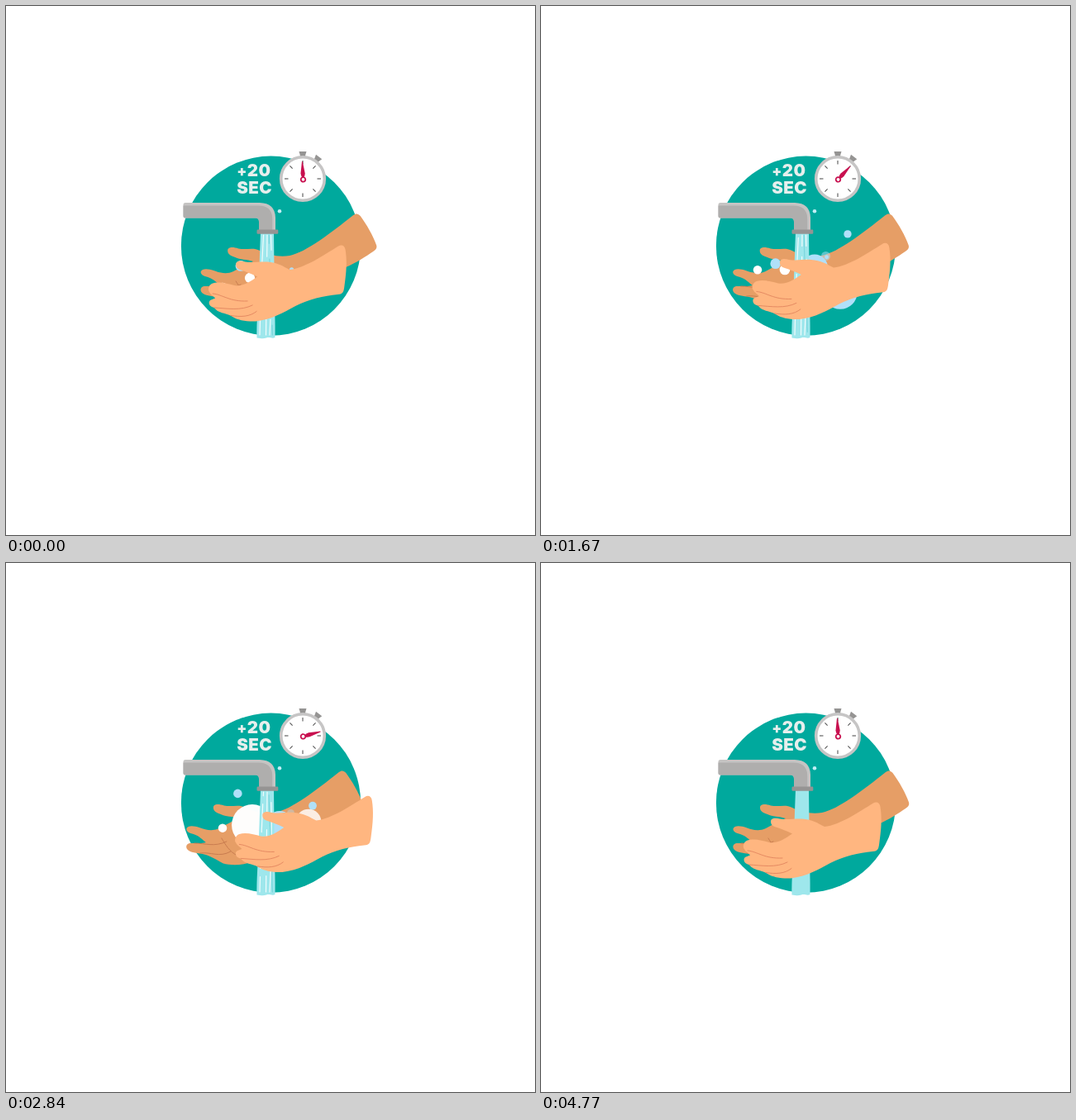
An HTML page that plays this animation: 640x640 px, repeating every 4.8 s.

```html
<!DOCTYPE html>
<html lang="en">
<head>
<meta charset="utf-8">
<title>Wash your hands</title>
<style>
html, body { margin: 0; width: 100%; height: 100%; overflow: hidden; background: #fff; }
svg { display: block; width: 100%; height: 100%; }
text { font-family: Inter, Roboto, sans-serif; font-weight: 900; font-size: 20.5px; letter-spacing: .4px; fill: #e6efed; }
.line { fill: none; stroke-width: 1; stroke-linecap: round; }
</style>
</head>
<body>
<svg viewBox="0 0 640 640">
  <circle cx="320.5" cy="290.2" r="108.6" fill="#00a99d"/>
  <text x="279.3" y="206.3"><tspan font-size="17.5" dy="-.6">+</tspan><tspan dy=".6">20</tspan></text>
  <text x="279.3" y="226.7">SEC</text>

  <g transform="translate(359 209)">
    <path id="knob" d="M-4.5 -33H4.5L3.2 -28.5V-26H-3.2V-28.5Z" fill="#959493"/>
    <use href="#knob" transform="rotate(36.5)"/>
    <circle r="26.3" fill="#fff" stroke="#c6c5c5" stroke-width="3.6"/>
    <g id="ticks" stroke="#555" stroke-width="1.1"></g>
  </g>
  <g id="needle" fill="#c8104f">
    <path d="M-.4 -21.8H.4L2.6 -7.5Q2.5 -4 1 -2.5H-1Q-2.5 -4 -2.6 -7.5Z"/>
    <circle r="2.8" fill="#fff" stroke="#c8104f" stroke-width="1.8"/>
  </g>

  <g id="back">
    <path fill="#e69e66" d="M265 296C265 291 272 291.5 278 293.5C288 295.5 296 291.5 304 296C314 301 326 304 340 302C360 298 392 273 417 253C420 250.5 423 251 425.5 254C433 264 441 278 445 289.5C446 293 444 295 441 297C432 303 422 310 408 316L340 345L312 361C302 366 286 366 277 363.5C268 359 263 354.5 252 352C245 351 237 350 234 347C231 344 232 339 238 339C243 338.5 250 340 256 338C252 335 248 330 241 328C236 327 232 325 232.5 321.5C234 317 242 318 248 320C256 323 264 325 272 321C280 317 288 312 296 309C288 306.5 280 307 274 304C268 302 265 300 265 296Z"/>
    <g class="line" stroke="#c97d50">
      <path d="M242 339C256 339 266 344 281 337"/>
      <path d="M249 351C262 349 272 357 286 349"/>
      <path d="M275 333C280 341 284 349 294 354"/>
    </g>
  </g>

  <g id="foam"></g>

  <path fill="#9ee7ec" d="M308 274H324L324.6 330C324.8 360 326 385 325.5 401C322 403 319 400 315 401.5C311 403 308 402 303.5 401.5C303 385 305 360 305.6 340Z"/>
  <g id="streaks" fill="none" stroke="#fff" stroke-width="1.2" stroke-opacity=".85" stroke-linecap="round">
    <path d="M311.5 277C309 320 308 360 307 398"/>
    <path d="M316 277C315.5 320 315 360 314.5 398"/>
    <path d="M320.5 277C322 320 321 360 319 398"/>
    <path d="M318 277C319 320 321.5 360 322.5 398" stroke="#74d3db"/>
  </g>

  <path fill="#c5c4c3" d="M217 238H307Q326 238.5 326 257V272H306V261Q306 256.5 302 256.5H217Q214.5 256.5 214.5 254V240.5Q214.5 238 217 238Z"/>
  <path fill="#afaead" d="M214.5 241.5H306Q322.3 242 322.3 258V272H306V261Q306 256.5 302 256.5H217Q214.5 256.5 214.5 254Z"/>
  <rect x="303.5" y="270.5" width="25.8" height="5.3" rx="1.2" fill="#959493"/>

  <g id="front">
    <path fill="#ffb680" d="M278 313C278 308 284 308 289 309.5C298 311 306 309 316 309.5C328 310 335 315 343 319C362 317 385 301 402 290.5C406 288 410 290 410.5 295C412.5 308 412 320 409 341C408 347 407 348.5 401 349C385 350.5 365 355 350 363C335 371 322 379 302 381.5C291 382 280 380 274 376C270 373 262 372 257 369.5C253 367.5 253 365 250 364.5C245 363 244 357 248 355.5L253 353.5C250 350 247 349 246 346C243.5 344 245 337 250 335.5C258 333 268 336 276 338C286 340 296 333 304 327.5C297 324 290 321.5 284 319.5C280 318.5 278 316 278 313Z"/>
    <g class="line" stroke="#e58a62">
      <path d="M250 348C262 349 270 358 292 357"/>
      <path d="M252 365C268 366 284 369 298 362"/>
      <path d="M272 374.5C284 376.5 295 376 303 369.5"/>
    </g>
  </g>
  <circle cx="331" cy="248.3" r="2.3" fill="#c2eef5"/>
</svg>
<script>
const LOOP = 4800, END = 4770, SWING = 857, LEAD = 0.21;
const NS = "http://www.w3.org/2000/svg";
const WHITE = "#fff", BLUE = "#b0e0f9";
const $ = id => document.getElementById(id);
const clamp = v => Math.max(0, Math.min(1, v));

function add(parent, tag, attrs) {
  const el = parent.appendChild(document.createElementNS(NS, tag));
  for (const k in attrs) el.setAttribute(k, attrs[k]);
  return el;
}

for (let i = 0; i < 8; i++) {
  add($("ticks"), "path", { d: "M0 -22V-17.5", transform: `rotate(${i * 45})` });
}

// Rising bubbles drift up; swelling ones grow in place.
const rise = (fill, period, x, dx, y, lift, r, dr, fade) => ({
  fill, period, start: 0,
  at: p => [x + dx * p, y - lift * p, r + dr * p, clamp((fade - p) * 20)]
});
const swell = (fill, period, start, x, y, r, dr, alpha) => ({
  fill, period, start, at: p => [x, y, r + dr * p, clamp(alpha(p))]
});

const bubbles = [
  swell(BLUE, 1250, -1180, 344.5, 302.5, 1, 16, p => Math.min(p * 1.8, (0.93 - p) * 3)),
  swell(BLUE, 1150, 0, 331, 316.5, 7, 20, p => Math.min(p * 7, (0.9 - p) * 12)),
  swell(BLUE, 2000, 370, 362, 346, 11, 15, p => Math.min((p - 0.45) * 14, (0.98 - p) * 15)),
  rise(BLUE, 1860, 371, 0, 319, 48, 5.2, -0.6, 0.95),
  swell(WHITE, 1480, 2000, 366, 313, 0, 27, p => Math.min(0.05 + p * 1.35, (0.85 - p) * 8)),
  swell(WHITE, 1480, 1800, 298, 317, 0, 35.5, p => Math.min(0.22 + p * 1.08, (0.86 - p) * 10)),
  rise(BLUE, 1570, 284, -4.5, 314.5, 44, 6.4, -1.4, 0.95),
  rise(WHITE, 1200, 262, 0, 340.5, 54, 5.8, -1.5, 0.82),
  rise(BLUE, 1340, 345.6, 0, 319, 62, 2.6, -0.5, 0.88),
  rise(WHITE, 1460, 295, 0, 329, 69, 6.1, 1.5, 0.93)
];
for (const b of bubbles) b.el = add($("foam"), "circle", { fill: b.fill });

const streaks = [...$("streaks").children];
streaks.forEach((s, i) => s.setAttribute("stroke-dasharray", `${34 + i * 9} ${10 + i * 3}`));

// The first outward stroke is quicker than the ones after it.
function swing(t) {
  const turn = (0.5 - LEAD) * SWING;
  return t < turn ? t / turn / 2 : t / SWING + LEAD;
}

function draw(t) {
  const live = t < END;
  const p = live ? swing(t) % 1 : 0;
  const far = 1 - Math.abs(1 - 2 * p);
  const soft = (1 - Math.cos(2 * Math.PI * (p - 0.012))) / 2;
  const move = (id, x, y) => $(id).setAttribute("transform", `translate(${x} ${y})`);
  move("front", 34 * far, -8 * far);
  move("back", live ? 3.2 - 17.4 * soft : 0, 0);

  const angle = live ? 0.0272 * t - 3 : -3;
  $("needle").setAttribute("transform", `translate(359.5 209.9) rotate(${angle})`);

  $("foam").style.display = $("streaks").style.display = live ? "" : "none";
  for (const b of bubbles) {
    const n = (t - b.start) / b.period;
    const [x, y, r, alpha] = b.at(n < 0 ? 0 : n % 1);
    b.el.setAttribute("cx", x);
    b.el.setAttribute("cy", y);
    b.el.setAttribute("r", r);
    b.el.setAttribute("opacity", n < 0 ? 0 : alpha);
  }
  streaks.forEach((s, i) => s.setAttribute("stroke-dashoffset", i * 17 - t * 0.16));
}

const begin = performance.now();
function tick() {
  draw((performance.now() - begin) % LOOP);
  requestAnimationFrame(tick);
}
tick();
</script>
</body>
</html>
```
